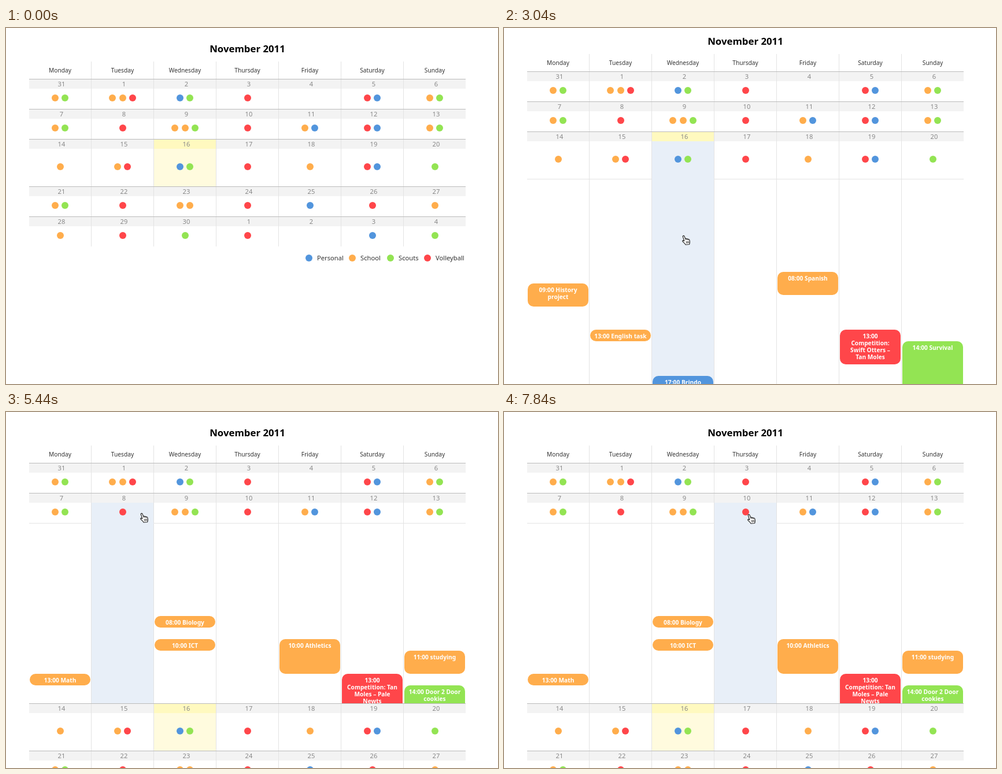
Animation of 851x616 px, one loop 8 s. Source, as an HTML page:

```html
<!DOCTYPE html>
<html lang="en">
<head>
<meta charset="utf-8">
<title>Calendar</title>
<style>
  * { box-sizing: border-box; }
  html, body { margin: 0; width: 100%; height: 100%; overflow: hidden; background: #fff; }
  #stage { position: relative; width: 851px; height: 616px; overflow: hidden;
    font: 11.2px/16px "Noto Sans", "Open Sans", sans-serif; color: #333; }
  #page { position: absolute; left: 40px; top: 0; width: 755px; }
  h1 { margin: 0; padding-top: 24px; height: 58px; font-size: 16.8px; line-height: 24px;
    text-align: center; color: #000; }
  .row { display: flex; }
  .cell { position: relative; flex: none; width: 108px; border-right: 1px solid #e3e3e3; }
  .cell:last-child { width: 107px; border-right: 0; }
  .head .cell { height: 30px; line-height: 30px; font-size: 10.2px; text-align: center; }
  .week { border-top: 1px solid #bbb; }
  .date { height: 16px; padding-left: 5px; text-align: center; color: #888; background: #f3f3f3; }
  .today { background: #fffbde; }
  .today .date { background: #fff9bf; }
  .cell.hover { background: #e8eff8; }
  .slot { height: 0; overflow: hidden; }
  .slot .cell { height: 481px; border-top: 1px solid #e3e3e3; }
  .slot .cell.hover { border-top-color: #e8eff8; }
  .dot { position: absolute; width: 12px; height: 12px; border-radius: 50%; }
  .event { position: absolute; left: 1px; width: 105px; padding-top: 5px; border-radius: 10px;
    overflow: hidden; font-size: 10.2px; font-weight: bold; line-height: 12px;
    text-align: center; white-space: pre; color: #fff; }
  .event.hover { opacity: .8; }
  .legend { position: relative; height: 60px; }
  .legend span { position: absolute; top: 12px; }
  .b { background: #5295dd; }
  .o { background: #ffad4c; }
  .g { background: #93e453; }
  .r { background: #ff464a; }
  #cursor { position: absolute; left: 0; top: 0; pointer-events: none; }
</style>
</head>
<body>
<div id="stage">
  <div id="page"><h1>November 2011</h1></div>
  <svg id="cursor" width="16" height="18" viewBox="0 0 16 18" stroke="#222" stroke-linejoin="round" stroke-linecap="round">
    <path fill="#fff" stroke-width="1.2" d="M2.2 2.6C2.6 1.2 4.4 1 5 2.4L6.6 6.6C7.6 5.9 8.6 6.2 9 7C9.9 6.5 10.9 6.8 11.3 7.6C12.6 7.2 13.6 7.8 13.9 9L14.4 12C14.5 13.5 14 14.5 13.6 16.5L7 17C6 14.8 4 13.6 2.2 11.6C1 10 2.6 9 4 10.2L4.8 10.6Z"/>
    <path fill="none" stroke-width=".9" d="M8.2 11.5l.8 3M10.1 11.2l.7 3M12 11l.5 2.8M6.6 6.6l.7 2M9 7l.5 1.5M11.3 7.6l.4 1.2"/>
  </svg>
</div>
<script>
const LOOP = 8000, TICK = 160;
const DAYS = ['Monday', 'Tuesday', 'Wednesday', 'Thursday', 'Friday', 'Saturday', 'Sunday'];
const WEEKS = [
  'og,oor,bg,r,,rb,og',
  'og,r,oog,r,ob,rb,og',
  'o,or,bg,r,o,rb,g',
  'og,r,oo,r,b,r,o',
  'o,r,g,r,,b,g'
];
const DOT_X = [[], [54], [45, 62], [36, 54, 71]];
const LEGEND = [['b', 484, 'Personal'], ['o', 559, 'School'], ['g', 625, 'Scouts'], ['r', 689, 'Volleyball']];

// week index -> [column, start hour, hours, colour, text]
const EVENTS = {
  1: [
    [0, 13, 1, 'o', '13:00 Math'], [0, 19, 2, 'g', '19:00 gathering'],
    [1, 19, 2, 'r', '19:00 Practice'],
    [2, 8, 1, 'o', '08:00 Biology'], [2, 10, 1, 'o', '10:00 ICT'],
    [2, 20, 3, 'g', '20:00 Cookie\nbake-off'],
    [3, 19, 2, 'r', '19:00 Practice'],
    [4, 10, 3, 'o', '10:00 Athletics'], [4, 17, 3, 'b', '17:00 Date with ...'],
    [5, 13, 3, 'r', '13:00\nCompetition: Tan\nMoles – Pale\nNewts'],
    [5, 18, 4, 'b', '18:00 Cinema: Zib\nZab'],
    [6, 11, 2, 'o', '11:00 studying'], [6, 14, 3, 'g', '14:00 Door 2 Door\ncookies']
  ],
  2: [
    [0, 9, 2, 'o', '09:00 History\nproject'],
    [1, 13, 1, 'o', '13:00 English task'],
    [2, 17, 2, 'b', '17:00 Brindo'],
    [4, 8, 2, 'o', '08:00 Spanish'],
    [5, 13, 3, 'r', '13:00\nCompetition:\nSwift Otters –\nTan Moles'],
    [6, 14, 8, 'g', '14:00 Survival']
  ]
};

// Motion tables: [ms, value...]
const CURSOR = [
  [160, 470, 385], [800, 341, 262], [1120, 341, 262], [1440, 337, 257], [2240, 337, 257],
  [2880, 315, 367], [3360, 315, 367], [4000, 337, 311], [4320, 337, 311],
  [4960, 239, 183], [5600, 239, 183], [6240, 310, 358], [6560, 321, 371],
  [6720, 321, 371], [7680, 428, 185]
];
const SCROLL = [[2560, 0], [2880, 13], [3040, 13], [3360, 24], [3520, 24], [4000, 5], [4480, 5], [4640, 0]];
const OPEN = {
  1: [[5120, 0], [5280, 46], [5440, 312], [5600, 481], [7680, 481], [7840, 312]],
  2: [[1760, 0], [1920, 283], [2080, 478], [2240, 481], [4320, 481], [4480, 240], [4640, 12], [4800, 0]]
};

const $ = id => document.getElementById(id);
const page = $('page'), cursor = $('cursor');

function add(parent, cls, text = '', style = {}) {
  const el = document.createElement('div');
  el.className = cls;
  el.textContent = text;
  Object.assign(el.style, style);
  return parent.appendChild(el);
}

const px = n => n + 'px';
const cells = {}, slots = [];

function addCell(row, week, col) {
  const cell = add(row, 'cell');
  const key = cell.dataset.key = week + '-' + col;
  if (key === '2-2') cell.classList.add('today');
  (cells[key] ||= []).push(cell);
  return cell;
}

const head = add(page, 'row head');
DAYS.forEach(day => add(head, 'cell', day));

WEEKS.forEach((line, w) => {
  const height = w === 2 ? 81 : 51;
  const week = add(page, 'week');
  const days = add(week, 'row', '', { height: px(height) });
  const slot = slots[w] = add(week, 'row slot');
  line.split(',').forEach((dots, c) => {
    const n = w * 7 + c;
    const cell = addCell(days, w, c);
    add(cell, 'date', n === 0 ? 31 : n > 30 ? n - 30 : n);
    [...dots].forEach((color, i) => add(cell, 'dot ' + color, '', {
      left: px(DOT_X[dots.length][i] - 6), top: px((height + 1) / 2)
    }));
    addCell(slot, w, c);
  });
  for (const [c, hour, hours, color, text] of EVENTS[w] || []) {
    add(slot.children[c], 'event ' + color, text, { top: px(hour * 20), height: px(hours * 20) });
  }
});

const legend = add(page, 'legend');
for (const [color, x, label] of LEGEND) {
  add(legend, 'dot ' + color, '', { left: px(x - 6), top: '14px' });
  const span = document.createElement('span');
  span.textContent = label;
  span.style.left = px(x + 14);
  legend.append(span);
}

function sample(table, t) {
  const i = table.findIndex(step => step[0] >= t);
  if (i < 0) return table.at(-1).slice(1);
  if (i === 0) return table[0].slice(1);
  const [t0, ...from] = table[i - 1], [t1, ...to] = table[i];
  const u = (t - t0) / (t1 - t0), k = u * u * (3 - 2 * u);
  return from.map((v, j) => Math.round(v + (to[j] - v) * k));
}

function hover(x, y) {
  document.querySelectorAll('.hover').forEach(el => el.classList.remove('hover'));
  const under = document.elementFromPoint(x, y);
  const cell = under?.closest('[data-key]');
  if (cell) cells[cell.dataset.key].forEach(el => el.classList.add('hover'));
  under?.closest('.event')?.classList.add('hover');
}

function render(t) {
  for (const w in OPEN) slots[w].style.height = px(sample(OPEN[w], t)[0]);
  page.style.top = px(-sample(SCROLL, t)[0]);
  const visible = t >= CURSOR[0][0];
  const [x, y] = sample(CURSOR, t);
  cursor.style.visibility = visible ? 'visible' : 'hidden';
  cursor.style.transform = `translate(${x - 8}px, ${y - 9}px)`;
  hover(visible ? x - 4 : -1, y - 7);
}

const start = performance.now();
let shown = -1;
function frame() {
  const t = Math.floor((performance.now() - start) % LOOP / TICK) * TICK;
  if (t !== shown) render(shown = t);
  requestAnimationFrame(frame);
}
frame();
</script>
</body>
</html>
```
